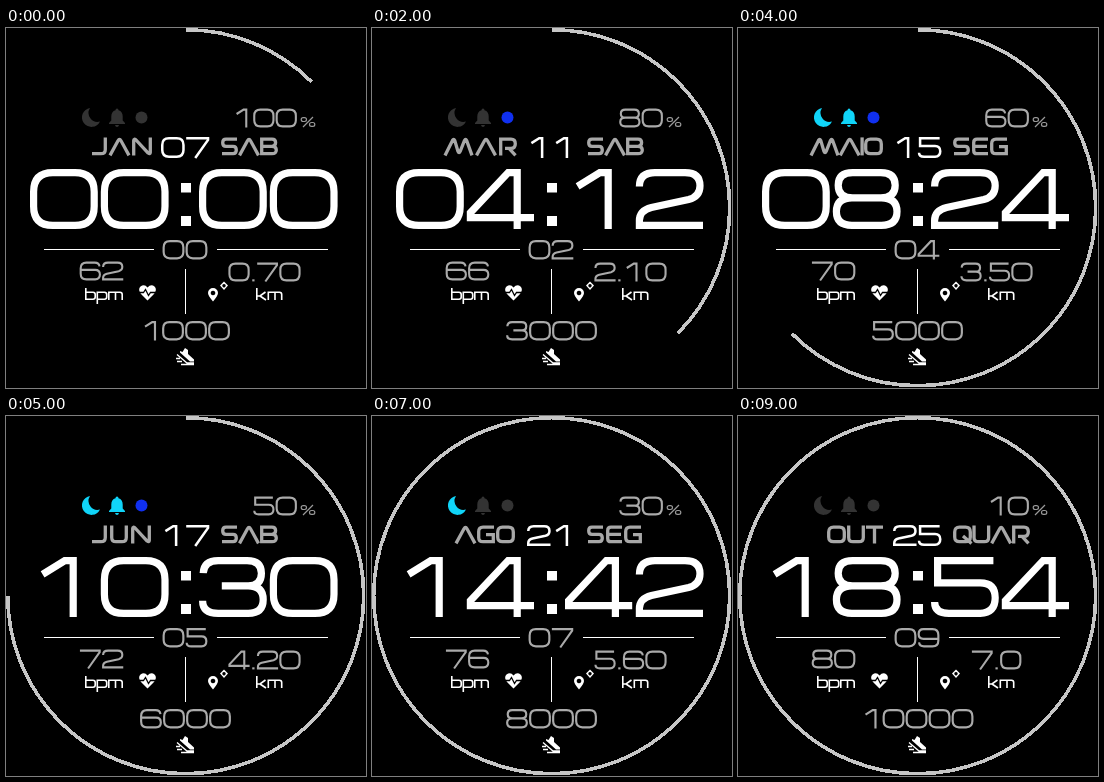
These frames come from a looping animation (360x360 px, 10 s). An HTML page:

```html
<!DOCTYPE html>
<html lang="pt">
<head>
<meta charset="utf-8">
<title>Watch face</title>
<style>
  html, body { margin: 0; width: 100%; height: 100%; overflow: hidden; background: #000; }
  svg { display: block; width: 100%; height: 100%; }
</style>
</head>
<body>
<svg viewBox="0 0 360 360">
  <rect width="360" height="360"/>
  <circle id="ring" cx="179.700" cy="179.700" r="178" fill="none" stroke="#c6c6c6" stroke-width="3.600"
    pathLength="8" transform="rotate(-90 179.700 179.700)" shape-rendering="crispEdges"/>

  <path id="moon" d="M84 80A9.5 9.5 0 1 0 94 93.500A9 9 0 0 1 84 80Z"/>
  <path id="bell" d="M111 80.500q1.500 0 1.500 1.800q4.200 1.200 4.200 6.200v4l2.300 2.500v1h-16v-1l2.300-2.500v-4q0-5 4.200-6.200q0-1.800 1.500-1.800ZM109 97h4q-.5 2-2 2t-2-2Z"/>
  <circle id="link" cx="135.500" cy="89.500" r="6"/>

  <g fill="#fff">
    <path d="M175 155h10v9.500h-10zM175 188h10v10h-10z"/>
    <path d="M38 221h110v1H38zM211 221h111v1H211zM179 241h1v45h-1z"/>
    <path d="M141.500 272.500L135 266Q131.500 261.500 134.500 258.500Q138.500 255.500 141.500 259.500Q145 255.500 148.500 258.500Q151.500 261.500 148 266Z"/>
    <path d="M133 264.500h4.500l2-3 3 6 2-3h6" fill="none" stroke="#000" stroke-width="1.300"/>
    <path fill-rule="evenodd" d="M207 273.500q-5-6-5-8.500a5 5 0 0 1 10 0q0 2.500-5 8.500ZM207 262.700a2.300 2.300 0 1 0 .01 0Z"/>
    <path fill-rule="evenodd" d="M218 253.500l4 4-4 4.500-4-4.500ZM218 256a1.700 1.700 0 1 0 .01 0Z"/>
    <path d="M174 323l2.500 1 2.500-4 3 2 0 4 6 5.500v2h-4l-10-9z"/>
    <path d="M171 326.500l10 8.500h7M170 330.500h4M171 333.500h5M175 336.500h13" fill="none" stroke="#fff" stroke-width="1.300"/>
  </g>
  <g id="units" fill="none"></g>
  <g id="read" fill="none"></g>
</svg>
<script>
const $ = id => document.getElementById(id);

// Digits sit in a 113 x 100 box.
const DIGITS = {
  0: 'M38 6H75Q107 6 107 38V62Q107 94 75 94H38Q6 94 6 62V38Q6 6 38 6Z',
  1: 'M21 29 58 6H72V100',
  2: 'M6 29Q6 6 32 6H82Q107 6 107 28Q107 46 88 51L26 64Q6 69 6 86V94H112',
  3: 'M7 27Q8 6 32 6H80Q104 6 104 27T82 48H38M82 48Q107 48 107 71T82 94H32Q6 94 6 73',
  4: 'M112 81H6V73L69 6H84V100',
  5: 'M104 6H11V43H82Q107 43 107 68T82 94H30Q6 94 6 75',
  6: 'M105 26Q103 6 80 6H36Q6 6 6 36V64Q6 94 36 94H82Q107 94 107 69T82 44H6',
  7: 'M2 6H106V14L45 100',
  8: 'M33 6H80Q104 6 104 27T80 48H33Q9 48 9 27T33 6ZM32 48H81Q107 48 107 71T81 94H32Q6 94 6 71T32 48Z',
  9: 'M8 74Q10 94 33 94H77Q107 94 107 64V36Q107 6 77 6H31Q6 6 6 31T31 56H107',
  '.': 'M8 94H20'
};

// Letters: width, then centre lines. Capitals are 18 px high, small letters 12 px.
const LETTERS = {
  A: [21, 'M1 18 9 3.4Q10.5 .8 12 3.4L20 18'],
  B: [18, 'M1.7 1.7H12Q15.6 1.7 15.6 5.2T12 8.9H1.7M12 8.9Q16.3 8.9 16.3 12.6T12 16.3H1.7V0'],
  E: [16, 'M16 1.7H5Q1.7 1.7 1.7 5V13Q1.7 16.3 5 16.3H16M1.7 9H15'],
  F: [16, 'M16 1.7H5Q1.7 1.7 1.7 5V18M1.7 9.6H15'],
  G: [18, 'M17 1.7H6Q1.7 1.7 1.7 6V12Q1.7 16.3 6 16.3H16.3V9.2H9'],
  I: [3.4, 'M1.7 0V18'],
  J: [15, 'M13.3 0V12Q13.3 16.3 9 16.3H0'],
  L: [15, 'M1.7 0V13Q1.7 16.3 5 16.3H15'],
  M: [29, 'M1 18 8.5 3Q9.7 .8 10.7 3L14 14Q15 16.5 16.2 14L20.500 3Q21.600 .8 22.600 3L28 18'],
  N: [20, 'M1.7 18V3Q1.7 1 4 2.5L16 15.5Q18.3 17 18.3 15V0'],
  O: [19, 'M6.5 1.7H12.5Q17.3 1.7 17.3 6.5V11.5Q17.3 16.3 12.5 16.3H6.5Q1.7 16.3 1.7 11.5V6.5Q1.7 1.7 6.5 1.7Z'],
  R: [18, 'M1.7 18V1.7H12Q16.3 1.7 16.3 6.3T12 11H6M10 11 16.5 18'],
  S: [17, 'M16 1.7H5Q1.7 1.7 1.7 5.3T5 9H12Q15.3 9 15.3 12.6T12 16.3H1'],
  T: [17, 'M0 1.7H17M8.5 1.7V18'],
  U: [18, 'M1.7 0V12Q1.7 16.3 6 16.3H12Q16.3 16.3 16.3 12V0'],
  V: [20, 'M1 0 8.5 14.6Q10 17 11.5 14.6L19 0'],
  b: [11, 'M.8 0V11.2H8Q10.2 11.2 10.2 9V6.5Q10.2 4.2 8 4.2H.8'],
  k: [11, 'M.8 0V12M.8 8H4L9.5 4M4 8 10 12'],
  m: [15, 'M.8 12V4.2H12Q14.2 4.2 14.2 6.5V12M7.5 4.2V12'],
  p: [11, 'M.8 16V4.2H8Q10.2 4.2 10.2 6.5V9Q10.2 11.2 8 11.2H.8'],
  '%': [15, 'M.7 2.6Q.7 .7 2.7 .7H4Q6 .7 6 2.6T4 4.500H2.7Q.7 4.500 .7 2.6ZM9 7.400Q9 5.500 11 5.500H12.3Q14.3 5.500 14.3 7.400T12.3 9.300H11Q9 9.300 9 7.400ZM12.500 0 2.500 10']
};
LETTERS.Q = [19, LETTERS.O[1] + 'M10 10.5 18.5 18'];

const MONTHS = [['JAN', 86, 146], ['FEV', 88, 146], ['MAR', 72, 145], ['ABR', 86, 145], ['MAIO', 72, 145],
  ['JUN', 86, 145], ['JUL', 92, 145], ['AGO', 83, 143], ['SET', 90, 145], ['OUT', 89, 145]];
const DAYS = { SAB: 272, QUIN: 285, SEG: 270, QUAR: 292 };
const WEEK = ['SAB', 'QUIN', 'SAB', 'QUIN', 'SEG', 'SAB', 'QUAR', 'SEG', 'SAB', 'QUAR'];

const pad = n => String(n).padStart(2, '0');
const glyph = (d, x, y, scale = 1) => `<path d="${d}" transform="translate(${x} ${y}) scale(${scale})"/>`;
const group = (label, color, width, body) =>
  `<g role="img" aria-label="${label}" stroke="${color}" stroke-width="${width}">${body}</g>`;

// align: 0 left, 0.5 centre, 1 right
function number(str, x, y, scale, { align = 0.5, color = '#aaa', width = 11, step = 118, one = 108 } = {}) {
  const advance = c => c === '.' ? 32 : c === '1' ? one : step;
  const total = [...str].reduce((sum, c) => sum + advance(c), 113 - step);
  let at = x - total * scale * align;
  const body = [...str].map(c => {
    const out = glyph(DIGITS[c], at, y, scale);
    at += advance(c) * scale;
    return out;
  }).join('');
  return group(str, color, width, body);
}

// Letters are spaced evenly between two edges.
function word(str, left, right, y = 109.4, color = '#a8a8a8', width = 3.3) {
  const used = [...str].reduce((sum, c) => sum + LETTERS[c][0], 0);
  const gap = (right - left - used) / Math.max(1, str.length - 1);
  let x = left;
  const body = [...str].map(c => {
    const out = glyph(LETTERS[c][1], x, y);
    x += LETTERS[c][0] + gap;
    return out;
  }).join('');
  return group(str, color, width, body);
}

$('units').innerHTML =
  word('bpm', 79, 117, 260, '#fff', 1.6) +
  word('km', 250, 276.5, 260, '#fff', 1.6) +
  word('%', 294.5, 309.5, 89, '#999', 1.2);

function draw(k) {
  const big = { align: 0, color: '#fff', width: 12, one: 118 };
  const lit = (id, from, color) => $(id).setAttribute('fill', k >= from && k < from + 4 ? color : '#333');
  lit('moon', 4, '#10d4f8');
  lit('bell', 3, '#10d4f8');
  lit('link', 2, '#1030f0');
  $('ring').setAttribute('stroke-dasharray', k < 7 ? `${k + 1} 8` : 'none');

  const km = (0.7 * (k + 1)).toFixed(k < 9 ? 2 : 1);
  $('read').innerHTML =
    number(`${100 - 10 * k}`, 291, 80.5, 0.19, { align: 1 }) +
    word(...MONTHS[k]) +
    number(pad(7 + 2 * k), 155, 109, 0.21, { align: 0, color: '#fff', width: 12, one: 118 }) +
    word(WEEK[k], 215, DAYS[WEEK[k]]) +
    number(pad(2 * k), 24, 141, 0.6, big) +
    number(pad(6 * k), 193, 141, 0.6, big) +
    number(pad(k), 179, 212, 0.195, { one: 118 }) +
    number(`${62 + 2 * k}`, 95.5, 233.5, 0.19) +
    number(km, 258.5, 234.5, 0.19, { one: 118 }) +
    number(`${1000 * (k + 1)}`, 179.5, 293, 0.195);
}

let shown = -1;
function tick() {
  const k = Math.floor(performance.now() / 1000) % 10;
  if (k !== shown) draw(shown = k);
  requestAnimationFrame(tick);
}
tick();
</script>
</body>
</html>
```
